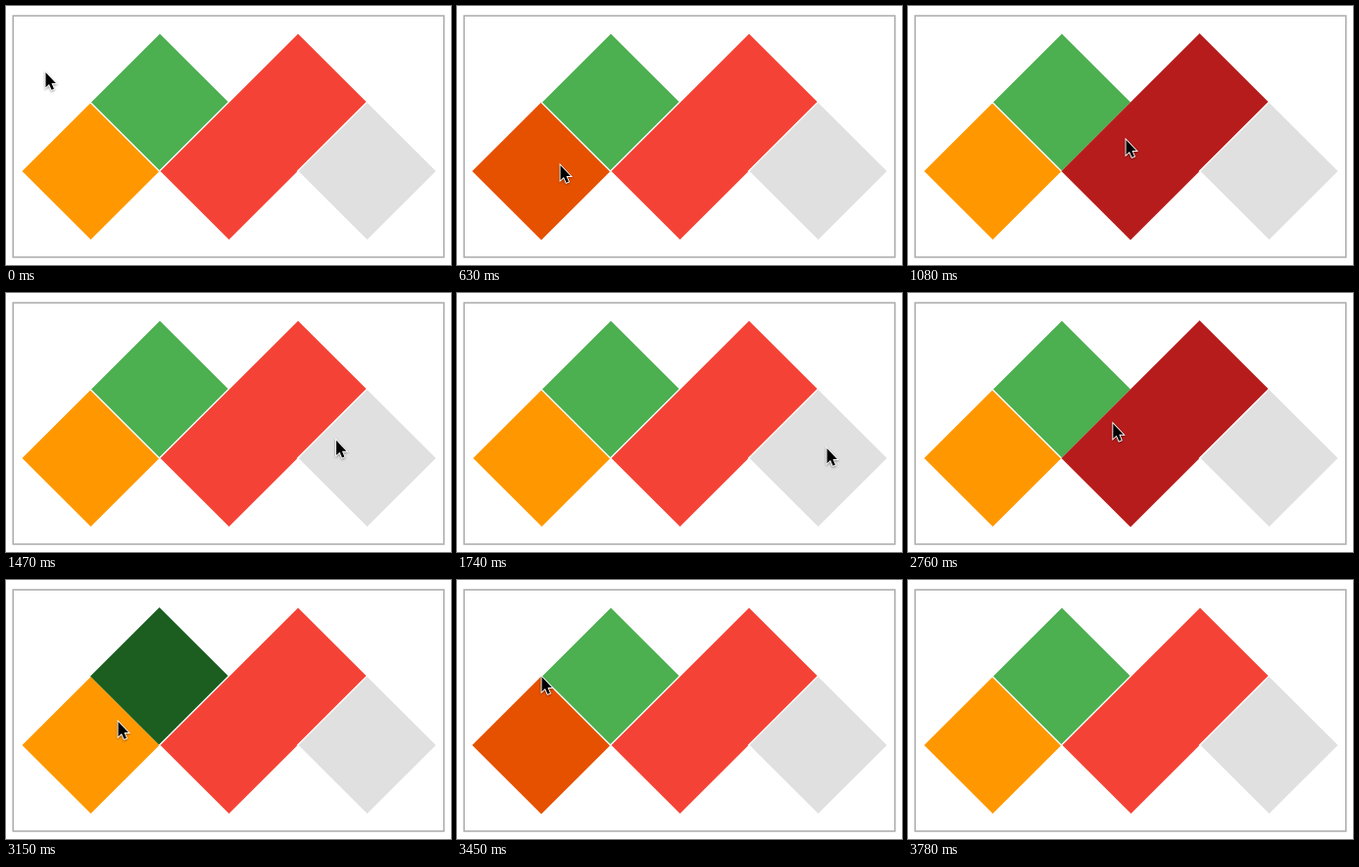
These frames come from a looping animation (454x265 px, 4500 ms). An HTML page:

```html
<!DOCTYPE html>
<html lang="en">
<head>
<meta charset="utf-8">
<title>Hover shapes</title>
<style>
  html, body { margin: 0; width: 100%; height: 100%; overflow: hidden; background: #fff; }
  svg { display: block; width: 454px; height: 265px; }
  .frame { fill: none; stroke: #aaa; stroke-width: 1.5; }
  .block { fill: var(--base); }
  .edge { fill: none; stroke: #fff; stroke-width: 1.4; }
  .hover .block { fill: var(--dark); }
  .hover:not(.gray) .edge { stroke: none; }
  .orange { --base: #ff9800; --dark: #e65100; }
  .green { --base: #4caf50; --dark: #1b5e20; }
  .red { --base: #f44336; --dark: #b71c1c; }
  .gray { --base: #e0e0e0; --dark: #e0e0e0; }
  #cursor { filter: drop-shadow(0.5px 1px 0.8px rgba(0, 0, 0, .4)); }
</style>
</head>
<body>
<svg viewBox="0 0 454 265">
  <rect class="frame" x="7.2" y="10" width="439.6" height="247"/>
  <g id="shapes"></g>
  <g id="cursor">
    <path d="M.5 1V16.2L4 13L6.5 18.8L8.9 17.8L6.5 12.1H10.9Z"
          fill="#000" stroke="#fff" stroke-width="1.8" paint-order="stroke"/>
  </g>
</svg>
<script>
  const LOOP = 4500, STEP = 30, EXIT = 3780;
  const UNIT = 70.5, LEFT = 15.5, TOP = 28;

  function add(parent, tag, className) {
    const el = document.createElementNS('http://www.w3.org/2000/svg', tag);
    el.setAttribute('class', className);
    return parent.appendChild(el);
  }

  // A tilted block: top corner in grid units and its length down to the left
  function makeShape(name, col, row, length) {
    const corners = [[0, 0], [1, 1], [1 - length, 1 + length], [-length, length]];
    const pts = corners.map(([x, y]) => [LEFT + (col + x) * UNIT, TOP + (row + y) * UNIT]);
    const el = add(document.getElementById('shapes'), 'g', name);
    add(el, 'polygon', 'block').setAttribute('points', pts.join(' '));
    // White gap along both left sides
    add(el, 'polyline', 'edge').setAttribute('points', [pts[0], pts[3], pts[2]].join(' '));
    return { el, pts };
  }

  const shapes = [
    makeShape('orange', 1, 1, 1),
    makeShape('green', 2, 0, 1),
    makeShape('red', 4, 0, 2),
    makeShape('gray', 5, 1, 1),
  ];

  // Pointer stops: time, x, y
  const path = [
    [150, 40, 67], [630, 105, 162], [1080, 222, 136], [1740, 377, 158],
    [2040, 377, 158], [2250, 321, 131], [3120, 129, 139], [3150, 114, 144],
    [3450, 86, 98], [3660, 80, 38], [3780, 60, -30],
  ];

  function slope(i, k) {
    const a = path[i - 1], b = path[i], c = path[i + 1];
    if (!a || !c || a[k] === b[k] || b[k] === c[k]) return 0;
    return (c[k] - a[k]) / (c[0] - a[0]);
  }

  // Smooth curve through the stops
  function pointer(t) {
    let i = 0;
    while (i < path.length - 2 && t >= path[i + 1][0]) i++;
    const a = path[i], b = path[i + 1], d = b[0] - a[0];
    const u = Math.min(1, Math.max(0, (t - a[0]) / d)), v = 1 - u;
    return [1, 2].map(k =>
      v * v * ((1 + 2 * u) * a[k] + u * d * slope(i, k)) +
      u * u * ((1 + 2 * v) * b[k] - v * d * slope(i + 1, k)));
  }

  const inside = (pts, [x, y]) => pts.every(([ax, ay], i) => {
    const [bx, by] = pts[(i + 1) % pts.length];
    return (bx - ax) * (y - ay) >= (by - ay) * (x - ax);
  });

  const cursor = document.getElementById('cursor');
  const start = performance.now();

  function draw(now) {
    const elapsed = Math.max(0, now - start) % LOOP;
    const t = Math.floor(elapsed / STEP + 1e-6) * STEP;
    const [x, y] = pointer(t);
    cursor.setAttribute('transform', `translate(${x.toFixed(1)} ${y.toFixed(1)})`);
    cursor.style.display = t >= EXIT ? 'none' : '';
    // Hover follows the pointer one step late
    const spot = pointer(t - STEP);
    for (const { el, pts } of shapes) el.classList.toggle('hover', inside(pts, spot));
    requestAnimationFrame(draw);
  }
  draw(start);
</script>
</body>
</html>
```
